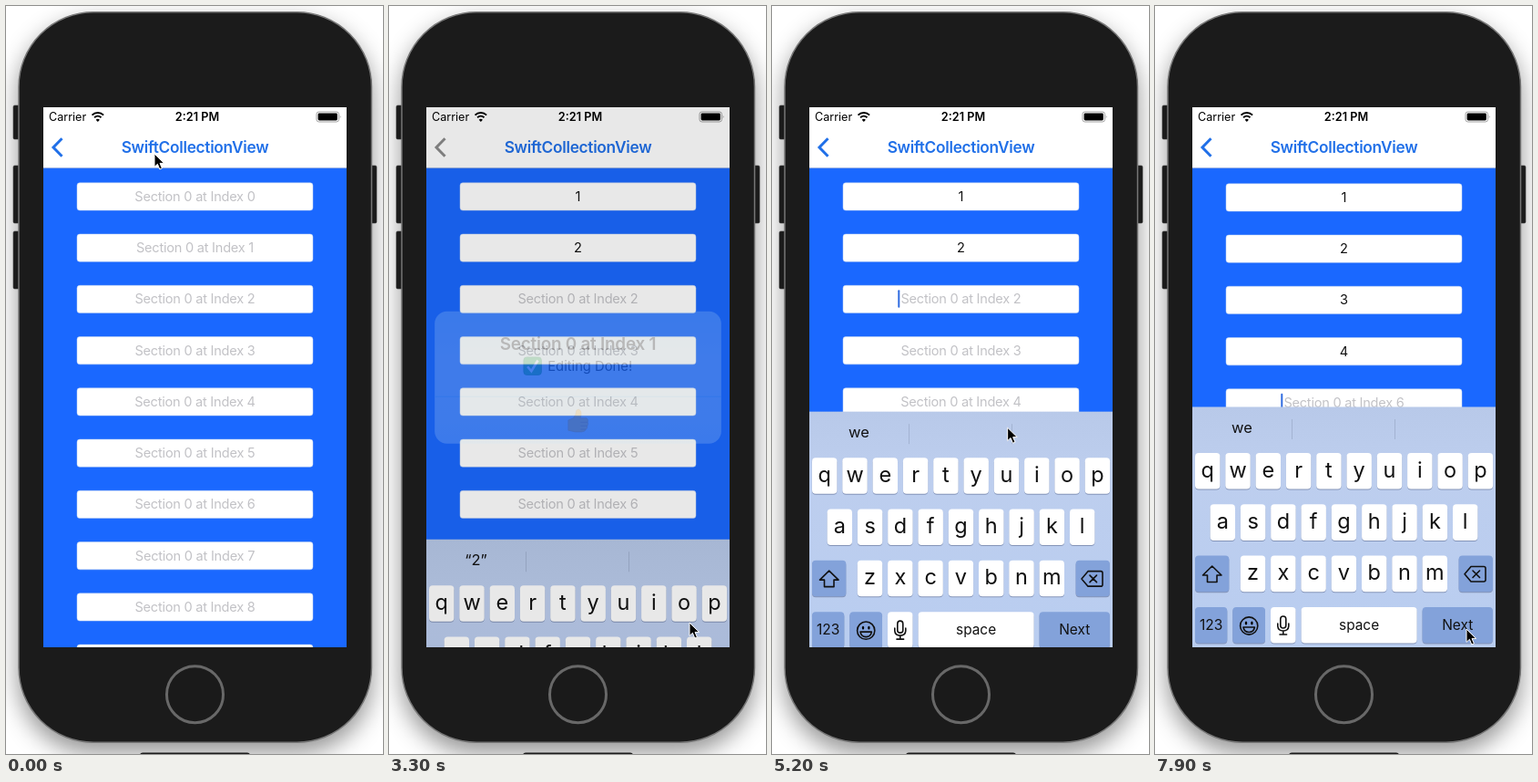
An HTML page for the animation above (8000 ms loop, 414 px wide and 820 px high).

```html
<!DOCTYPE html>
<html lang="en">
<head>
<meta charset="utf-8">
<title>Collection view form</title>
<style>
  html, body { margin: 0; width: 100%; height: 100%; overflow: hidden; background: #fff; }
  svg { display: block; width: 100vw; height: 100vh; }
  text { font-family: Inter, Roboto, sans-serif; text-anchor: middle; white-space: pre; }
  .phone { filter: drop-shadow(0 11px 13px rgba(0, 0, 0, .42)); }
  .line { fill: none; stroke: #111; stroke-width: 1.6; stroke-linejoin: round; stroke-linecap: round; }
</style>
</head>
<body>
<svg viewBox="0 0 414 820">
  <defs>
    <clipPath id="screen"><rect x="41" y="111" width="333" height="592"/></clipPath>
    <clipPath id="list"><rect x="41" y="178" width="333" height="525"/></clipPath>
    <linearGradient id="boardFill" x2="0" y2="1">
      <stop stop-color="#b8c9e9"/><stop offset=".25" stop-color="#bdceee"/><stop offset="1" stop-color="#b9cdf0"/>
    </linearGradient>
    <linearGradient id="alertFill" x2="0" y2="1">
      <stop stop-color="#c5e4f6"/><stop offset=".35" stop-color="#d9eaf6"/>
      <stop offset=".8" stop-color="#d7eaf6"/><stop offset="1" stop-color="#cae7f7"/>
    </linearGradient>
  </defs>

  <g fill="#222" stroke="#444" stroke-width=".6">
    <rect x="8" y="109" width="8" height="37" rx="1.5"/>
    <rect x="8" y="175" width="8" height="63" rx="1.5"/>
    <rect x="8" y="247" width="8" height="63" rx="1.5"/>
    <rect x="399" y="175" width="8" height="63" rx="1.5"/>
  </g>
  <rect class="phone" x="14" y="6.7" width="387.5" height="800.5" rx="82" fill="#1b1b1b" stroke="#777" stroke-width="1.5"/>
  <circle cx="207.5" cy="754.7" r="31" fill="#1a1a1a" stroke="#686868" stroke-width="3"/>
  <rect x="147" y="818.5" width="121" height="8" rx="3" fill="#1b1b1b"/>

  <g clip-path="url(#screen)">
    <rect x="41" y="111" width="333" height="592" fill="#1a68ff"/>
    <g clip-path="url(#list)"><g id="fields"></g></g>
    <rect x="41" y="111" width="333" height="66.5" fill="#fff"/>
    <path d="M41 177.6H374" stroke="#a9b6cd" stroke-width=".6"/>
    <g id="bar"></g>
    <path d="M94.5 119.6A9.1 9.1 0 0 1 107.1 119.6M97.1 122.3A5.4 5.4 0 0 1 104.5 122.3" fill="none" stroke="#000" stroke-width="2"/>
    <path d="M100.8 127L98.7 124.8A3 3 0 0 1 102.9 124.8Z"/>
    <rect x="341" y="116" width="24.5" height="11" rx="2.6" fill="#fff" stroke="#999" stroke-width=".9"/>
    <rect x="342.6" y="117.6" width="21.3" height="7.8" rx="1.4"/>
    <path d="M366.8 119.8q1.8 1.7 0 3.5Z" fill="#999"/>
    <path id="back" d="M61.5 145.2L52 155L61.5 164.8" fill="none" stroke-width="3"/>
    <g id="board"></g>
    <rect id="dim" x="41" y="111" width="333" height="592" opacity="0"/>
    <g id="alert"></g>
  </g>
  <path id="cursor" d="M0 0V14.4L3.4 11.3L5.8 17L8.4 15.9L6 10.4H10.6Z" stroke="#fff" stroke-width="1" stroke-linejoin="round"/>
</svg>

<script>
const LOOP = 8000, PITCH = 56.25, MIDDLE = 207.5;
const get = id => document.getElementById(id);

const text = (x, y, size, str, extra = '') =>
  `<text x="${x}" y="${y}" font-size="${size}" ${extra}>${str}</text>`;
const box = (x, y, w, h, r, fill, extra = '') =>
  `<rect x="${x}" y="${y}" width="${w}" height="${h}" rx="${r}" fill="${fill}" ${extra}/>`;

// Story: when each field gains focus and when its digit is typed.
const entries = [
  { focus: 680, typed: 1900, value: '1' },
  { focus: 2620, typed: 2900, value: '2' },
  { focus: 4880, typed: 5500, value: '1' },
  { focus: 6000, typed: 6500, value: '2' },
  { focus: 6800, typed: 7000, value: '3' },
  { focus: 7300, typed: 7500, value: '4' },
  { focus: 7800, typed: Infinity, value: '' }
];
const ALERT_IN = 3200, ALERT_OUT = 4200;
const nextTaps = [2620, ALERT_IN, 6000, 6800, 7300, 7800];

const cursorPath = [
  [0, 163, 162], [500, 170, 264], [700, 170, 264], [1100, 169, 259], [1600, 169, 259],
  [2100, 325, 728], [2400, 330, 676], [3350, 330, 676], [3900, 250, 472], [4100, 218, 452],
  [4200, 216, 450], [4600, 215, 321], [5000, 215, 321], [5500, 338, 719], [5800, 342, 683],
  [6200, 342, 683], [6500, 342, 690], [6800, 342, 683], [LOOP, 342, 683]
];

function buildFields() {
  let html = '';
  for (let i = 0; i < 13; i++) {
    const y = 193.8 + i * PITCH;
    html += box(78, y, 259, 30.3, 3, '#fff', 'stroke="#b9cdf0" stroke-width=".5"') +
      text(MIDDLE, y + 20, 14.6, '', 'class="entry"');
  }
  get('fields').innerHTML = html + box(0, 0, 2, 19.5, 1, '#2f6be0', 'id="caret"');
}

function buildBar() {
  get('bar').innerHTML =
    text(67.6, 126.2, 12.6, 'Carrier') +
    text(210, 126.2, 12.7, '2:21 PM', 'font-weight="600"') +
    text(207.5, 161, 17.3, 'SwiftCollectionView', 'font-weight="600" fill="#2170e8" letter-spacing="-.3"');
}

function key(x, y, w, label, size, fill = '#fff', extra = '') {
  return box(x, y + 1, w, 39.6, 4, '#8494b8') + box(x, y, w, 39.6, 4, fill, extra) +
    text(x + w / 2, y + (size > 20 ? 26.5 : 25.3), size, label, 'fill="#111"');
}

function buildBoard() {
  const special = '#83a2da';
  let html = box(41, 439.5, 333, 264, 0, 'url(#boardFill)') +
    '<path d="M150.5 453V475M263.5 453V475" stroke="#a3b3d2"/>' +
    text(95.5, 467.5, 16.5, '', 'id="hint" fill="#111"');
  [['qwertyuiop', 44], ['asdfghjkl', 60.6], ['zxcvbnm', 93.8]].forEach(([row, left], r) =>
    [...row].forEach((c, i) => html += key(left + i * 33.3, 490 + r * 56.3, 27.4, c, 23.5)));
  html += key(44, 602.6, 37.3, '', 16, special) + key(333.6, 602.6, 37.3, '', 16, special) +
    key(44, 659, 35.3, '123', 15.5, special) + key(85.3, 659, 35.7, '', 16, special) +
    key(127, 659, 27.5, '', 16) + key(160.6, 659, 127, 'space', 15.4) +
    key(293.6, 659, 77.3, 'Next', 15.5, special, 'id="next"');
  html += `<g class="line">
    <path d="M62.7 614L52.5 624H57.5V631.5H68V624H73Z"/>
    <path d="M347 614.5H361Q363 614.5 363 616.5V629Q363 631 361 631H347L340 622.8ZM349 619L356.500 626.500M356.500 619L349 626.500"/>
    <circle cx="103.200" cy="679.500" r="9.600"/>
    <path d="M97 681H109.400Q108.400 686.500 103.200 686.500T97 681Z"/>
    <rect x="137.800" y="669" width="6" height="13" rx="3"/>
    <path d="M134.800 677V680Q135.300 685 140.800 685T146.800 680V677M140.800 685V689M137 689H144.600"/>
  </g><ellipse cx="100" cy="676.5" rx="1.2" ry="1.9"/><ellipse cx="106.4" cy="676.5" rx="1.2" ry="1.9"/>`;
  get('board').innerHTML = html;
}

function buildAlert() {
  get('alert').innerHTML = box(67, 342.5, 281, 129.5, 12, 'url(#alertFill)') +
    '<path d="M67 426H348" stroke="#9dcff2"/>' +
    text(MIDDLE, 380, 16.9, 'Section 0 at Index 1', 'font-weight="600" letter-spacing="-.22"') +
    text(219.3, 400.8, 13.2, 'Editing Done!') +
    box(154.3, 387.3, 17.4, 17.4, 3, '#20b04a', 'stroke="#158a38" stroke-width=".7"') +
    `<path d="M158 396.500L161.800 401L168.200 390.500" fill="none" stroke="#fff" stroke-width="2.400"/>
    <path d="M198 449L203 447Q206 443 206 439.500Q209 437 210.500 441Q211 444 209.700 447L216 447Q218 448.500 217 451Q218 453 216.700 454.500Q217 457 215.300 458Q214.500 460.500 211 460.500H205L198 459Z" fill="#fcbf3a" stroke="#dc9424" stroke-width=".6"/>
    <path d="M210 451H217M210 454.600H216.700M210 458H215.300" stroke="#d18a22" stroke-width=".8"/>`;
}

buildFields();
buildBar();
buildBoard();
buildAlert();
const labels = [...document.querySelectorAll('.entry')];

const clamp = v => Math.min(1, Math.max(0, v));
const smooth = v => { v = clamp(v); return v * v * (3 - 2 * v); };

// Critically damped spring from 0 to 1.
function spring(ms) {
  const p = Math.max(0, ms) * 0.01826;
  return 1 - (1 + p) * Math.exp(-p);
}

function cursorAt(t) {
  const i = cursorPath.findIndex(p => p[0] > t);
  const [t0, x0, y0] = cursorPath[i - 1], [t1, x1, y1] = cursorPath[i];
  const k = smooth((t - t0) / (t1 - t0));
  return [x0 + (x1 - x0) * k, y0 + (y1 - y0) * k];
}

function drawFields(t) {
  const scroll = t >= 7800 ? 111.5 : PITCH * smooth((t - 7300) / 120);
  get('fields').setAttribute('transform', `translate(0 ${-scroll})`);
  labels.forEach((label, i) => {
    const done = i < entries.length && t >= entries[i].typed;
    label.textContent = done ? entries[i].value : `Section 0 at Index ${i}`;
    label.setAttribute('fill', done ? '#111' : '#c2c2c6');
    label.setAttribute('letter-spacing', done ? 0 : -.25);
  });
}

function drawFocus(t) {
  const active = entries.filter(e => t >= e.focus).length - 1;
  const editing = active >= 0 && !(t >= ALERT_IN && t < entries[2].focus);
  const entry = entries[Math.max(0, active)];
  const typed = t >= entry.typed;
  const since = t - (typed ? entry.typed : entry.focus);
  const caret = get('caret');
  caret.setAttribute('x', typed ? 210 : 138.3);
  caret.setAttribute('y', 198.8 + active * PITCH);
  caret.setAttribute('opacity', editing && since % 1000 < 650 ? 1 : 0);
  get('hint').textContent = typed ? `“${entry.value}”` : 'we';
  const pressed = nextTaps.some(tap => t >= tap - 130 && t < tap);
  get('next').setAttribute('fill', pressed ? '#fff' : '#83a2da');
}

function draw(t) {
  drawFields(t);
  drawFocus(t);

  const raised = spring(t - entries[0].focus) - spring(t - ALERT_IN) + spring(t - entries[2].focus);
  get('board').setAttribute('transform', `translate(0 ${264 * (1 - raised)})`);

  const shown = smooth((t - ALERT_IN) / 350) - smooth((t - ALERT_OUT) / 300);
  const scale = t < ALERT_OUT ? 1.15 - .15 * shown : 1;
  get('dim').setAttribute('opacity', .44 * shown);
  get('alert').setAttribute('opacity', shown);
  get('alert').setAttribute('transform', `translate(207.5 407) scale(${scale}) translate(-207.5 -407)`);
  get('back').setAttribute('stroke', t >= ALERT_IN && t < ALERT_OUT ? '#8a8a8a' : '#2170e8');

  get('cursor').setAttribute('transform', `translate(${cursorAt(t)})`);
}

function tick() {
  draw(performance.now() % LOOP);
  requestAnimationFrame(tick);
}
tick();
</script>
</body>
</html>
```
